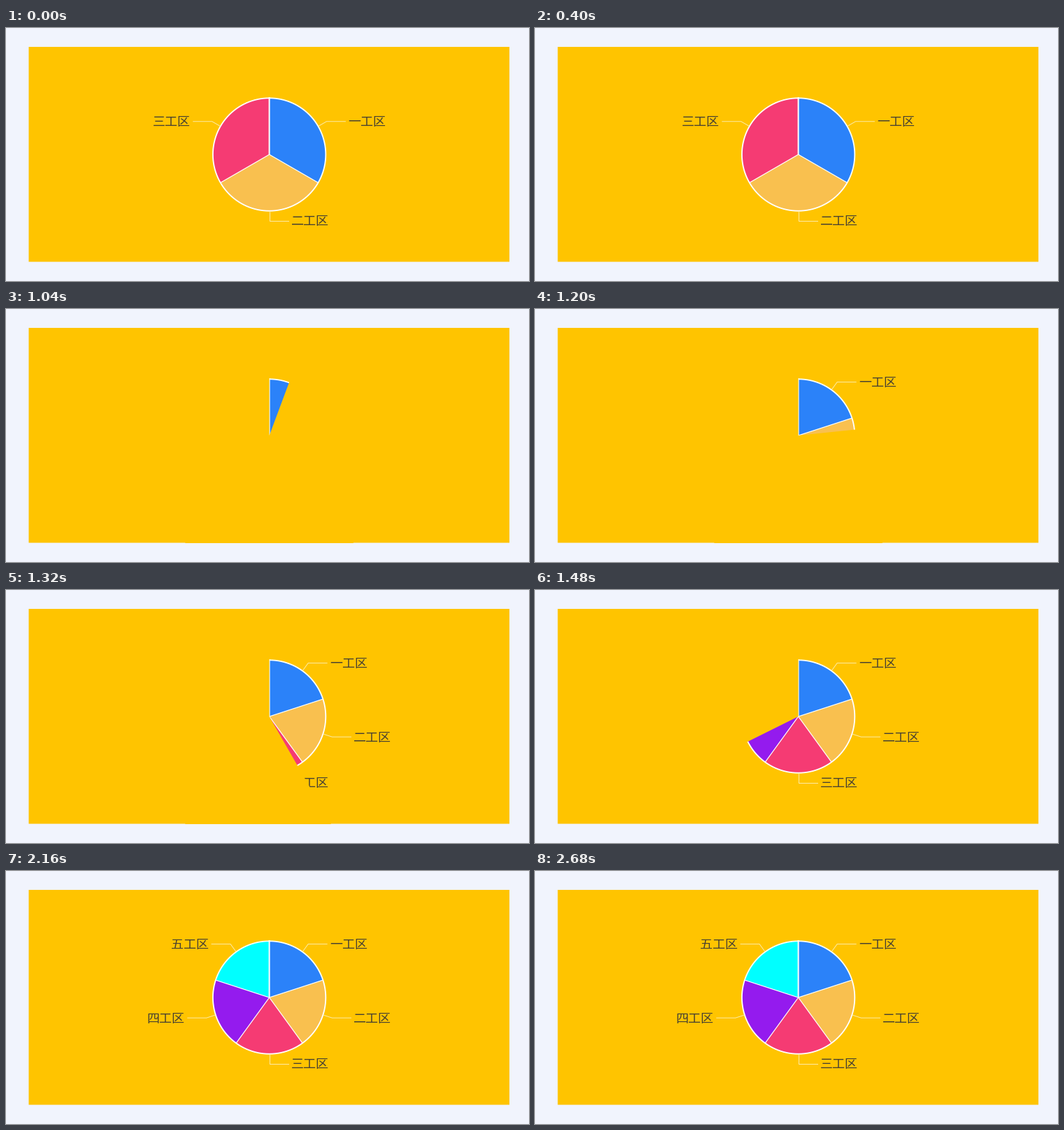
Write a matplotlib script that moves like this. It is 748 px wide and 362 px high and loops after 3.16 s.

```python
import numpy as np
import matplotlib.pyplot as plt
from matplotlib.animation import FuncAnimation
from matplotlib.patches import Polygon, Rectangle

W, H, DPI = 748, 362, 64
PX = 72 / DPI  # points per pixel
STEP, LOOP = 40, 3160

CX, CY, R = 376.6, 181, 80.7
ELBOW, ARM, GAP, FONT = 94.5, 27, 4, 18
COVER_R = 195

PAGE, PANEL = "#f1f4fd", "#ffc400"
INK, LEADER = "#474132", "#fdeba6"
COLORS = ["#2b82f9", "#f9c04f", "#f53b73", "#941bee", "#00ffff"]
NUMERALS = "一二三四五"

SWITCH = 880                    # three slices give way to five
SWEEP_START, SWEEP_TIME = 894, 953

fig = plt.figure(figsize=(W / DPI, H / DPI), dpi=DPI, facecolor=PAGE)
ax = fig.add_axes([0, 0, 1, 1])
ax.set_xlim(0, W)
ax.set_ylim(H, 0)
ax.axis("off")

panel = Rectangle((32.5, 27), 687.5, 307.5, fc=PANEL, lw=0, snap=False)
ax.add_patch(panel)


def polar(angle, r):
    """Point at a clockwise angle from twelve o'clock."""
    return CX + r * np.sin(angle), CY - r * np.cos(angle)


def sector(a0, a1, r):
    arc = np.column_stack(polar(np.linspace(a0, a1, 181), r))
    return np.vstack([[CX, CY], arc])


def stroke(xs, ys, color, width, z, **kw):
    return ax.plot(xs, ys, color=color, lw=width * PX, zorder=z, **kw)[0]


def label(angle, text):
    x0, y0 = polar(angle, R + 0.8)
    x1, y1 = polar(angle, ELBOW)
    side = 1 if x1 > CX - 1 else -1
    x2 = x1 + side * ARM
    line = stroke([x0, x1, x2], [y0, y1, y1], LEADER, 1, 4)
    left = x2 + GAP if side > 0 else x2 - GAP - FONT * len(text)
    word = ax.text(left, y1 + 6.6, text, color=INK, fontsize=FONT * PX,
                   family="Noto Sans CJK JP", ha="left", va="baseline",
                   zorder=5)
    return [line, word]


def pie(count):
    parts = []
    step = 2 * np.pi / count
    for i in range(count):
        wedge = Polygon(sector(i * step, (i + 1) * step, R),
                        fc=COLORS[i], lw=0, zorder=2)
        parts.append(ax.add_patch(wedge))
        parts += label((i + 0.5) * step, NUMERALS[i] + "工区")
    for i in range(count):
        x, y = polar(i * step, R)
        parts.append(stroke([CX, x], [CY, y], "white", 1.2 if i else 2, 3,
                            snap=False, solid_capstyle="butt"))
    rim = polar(np.linspace(0, 2 * np.pi, 361), R)
    parts.append(stroke(*rim, "white", 1.8, 3))
    return parts


three, five = pie(3), pie(5)

# Panel-coloured sector hiding what the sweep has not reached yet
cover = Polygon(sector(0, 2 * np.pi, COVER_R), fc=PANEL, lw=0, zorder=9)
ax.add_patch(cover)
cover.set_clip_path(panel)


def sweep(t):
    u = np.clip((t - SWEEP_START) / SWEEP_TIME, 0, 1)
    return (1 - np.cos(np.pi * u)) / 2


def draw(i):
    t = i * STEP
    switched = t >= SWITCH
    for part in three:
        part.set_visible(not switched)
    for part in five:
        part.set_visible(switched)
    p = sweep(t)
    cover.set_visible(switched and p < 1)
    cover.set_xy(sector(2 * np.pi * p, 2 * np.pi, COVER_R))
    return three + five + [cover]


anim = FuncAnimation(fig, draw, frames=LOOP // STEP, interval=STEP,
                     init_func=lambda: draw(0), repeat=True, repeat_delay=0)
plt.show()
```
